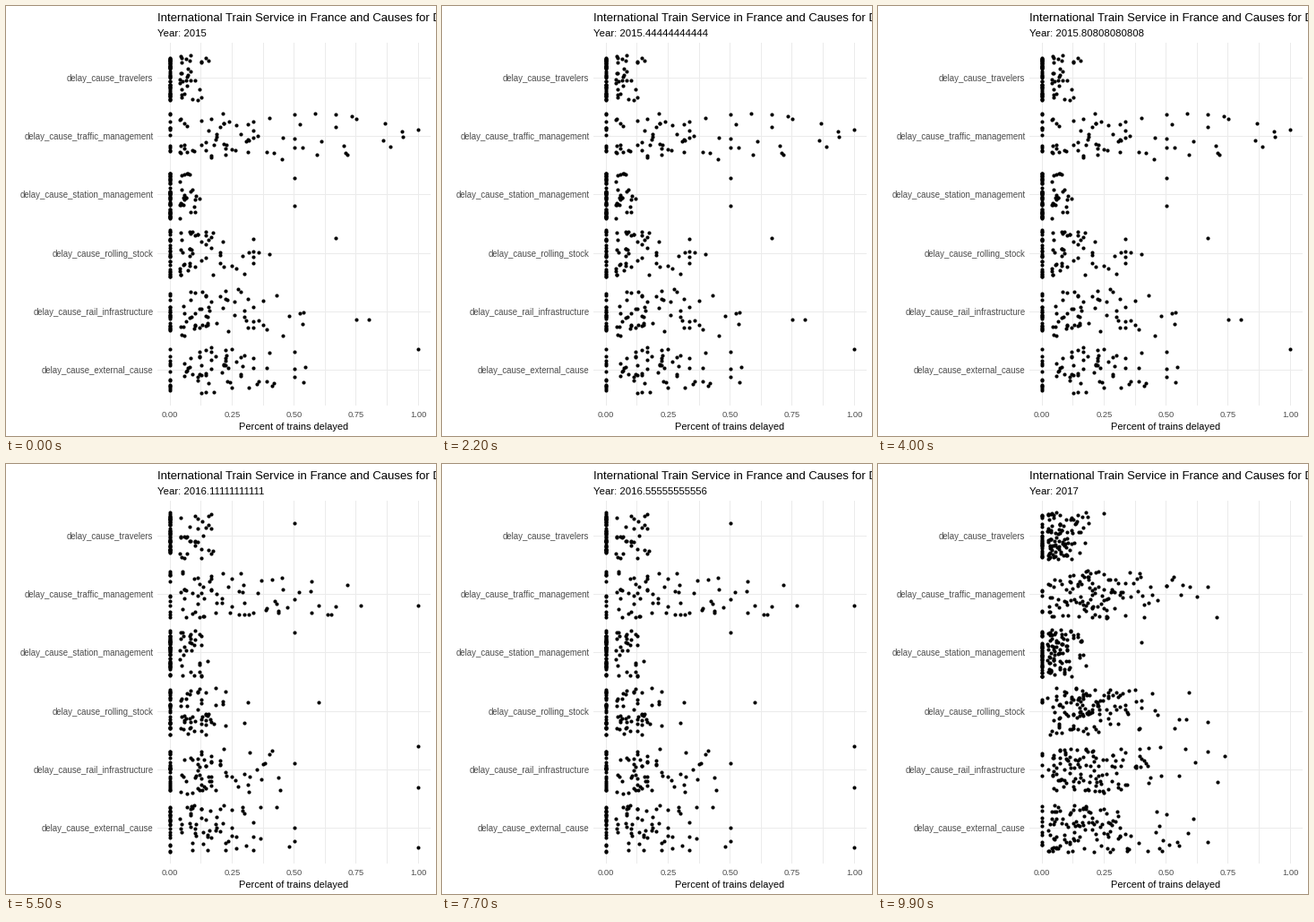
Recreate the animation shown at these times as a matplotlib script. Size 480 by 480 pixels, loop 10000 ms.

```python
import numpy as np
import matplotlib.pyplot as plt
from matplotlib.animation import FuncAnimation

SIZE, DPI = 480, 72          # at 72 dpi one point is one pixel
FRAMES, INTERVAL = 100, 100
X0, X_UNIT = 183.2, 277      # pixel of 0.00 and pixels per 1.00
Y0, Y_STEP = 80.2, 65.35
LEFT, RIGHT, TOP, BOTTOM = 169, 474, 41, 446
JITTER = 0.4 * Y_STEP
GRID, TICK = "#EBEBEB", "#4D4D4D"

CAUSES = ["travelers", "traffic_management", "station_management",
          "rolling_stock", "rail_infrastructure", "external_cause"]

# Routes per cause, range of trains per route, evenness, mean share per cause
YEARS = {
    2015: (82, (6, 26), 1.4, (.05, .34, .04, .13, .17, .18)),
    2016: (86, (6, 26), 1.4, (.06, .27, .05, .11, .17, .17)),
    2017: (125, (14, 45), 2.5, (.06, .22, .06, .20, .23, .20)),
}

# Isolated points: cause index, share, vertical offset in pixels
EXTREMES = {
    2015: [(1, 1, -8), (2, .5, -19), (2, .5, 12), (3, .667, -17),
           (4, .75, 8), (4, .8, 8), (5, 1, -24)],
    2016: [(0, .5, -14), (1, 1, 12), (2, .5, -23), (3, .6, -10),
           (4, 1, -27), (4, 1, 19), (5, 1, 21)],
    2017: [(0, .25, -25), (1, .667, -9), (2, .4, -12), (3, .667, 12),
           (4, .735, -16), (5, .667, 15)],
}


def cloud(year):
    """Jittered delay shares of one year, in pixels."""
    rng = np.random.default_rng(year)
    routes, trains_range, evenness, means = YEARS[year]
    parts = []
    for row, mean in enumerate(means):
        chance = rng.gamma(evenness, mean / evenness, routes)
        trains = rng.integers(*trains_range, routes)
        share = rng.binomial(trains, np.minimum(chance, 0.95)) / trains
        offset = rng.uniform(-JITTER, JITTER, routes)
        points = np.column_stack([np.full(routes, row), share, offset])
        parts.append(points[share <= 3.2 * mean])
    row, share, offset = np.vstack(parts + [EXTREMES[year]]).T
    return np.round(np.column_stack([X0 + X_UNIT * share,
                                     Y0 + Y_STEP * row + offset]))


plt.rcParams["font.family"] = "Liberation Sans"
fig = plt.figure(figsize=(SIZE / DPI, SIZE / DPI), dpi=DPI, facecolor="white")
ax = fig.add_axes([0, 0, 1, 1])
ax.set_xlim(0, SIZE)
ax.set_ylim(SIZE, 0)
ax.axis("off")


def label(x, y, text, size, color="black", ha="left"):
    return ax.text(x, y, text, fontsize=size, color=color, ha=ha,
                   va="baseline")


def grid_line(xs, ys):
    ax.plot(xs, ys, color=GRID, lw=1, solid_capstyle="butt", snap=False)


for k in range(9):
    x = X0 + X_UNIT * k / 8
    grid_line([int(x) + 0.5] * 2, [TOP, BOTTOM])
    if k % 2 == 0:
        label(x, 459, f"{k / 8:.2f}", 9.4, TICK, "center")

for row, cause in enumerate(CAUSES):
    y = int(Y0 + Y_STEP * row)
    grid_line([LEFT, RIGHT], [y + 0.5] * 2)
    label(164.5, y + 4, f"delay_cause_{cause}", 9.6, TICK, "right")

label(169, 17, "International Train Service in France and Causes for Delays",
      13.1)
subtitle = label(169, 34, "", 11.4)
label(321, 473, "Percent of trains delayed", 11, ha="center")

clouds = {year: cloud(year) for year in YEARS}
dots = ax.scatter([], [], s=17, c="black", linewidths=0, antialiased=False,
                  zorder=3)


def draw(i):
    time = 2015 + 2 * i / (FRAMES - 1)
    subtitle.set_text(f"Year: {time:.15g}")
    dots.set_offsets(clouds[int(time)])
    return subtitle, dots


anim = FuncAnimation(fig, draw, frames=FRAMES, interval=INTERVAL,
                     repeat=True, repeat_delay=0)
plt.show()
```
